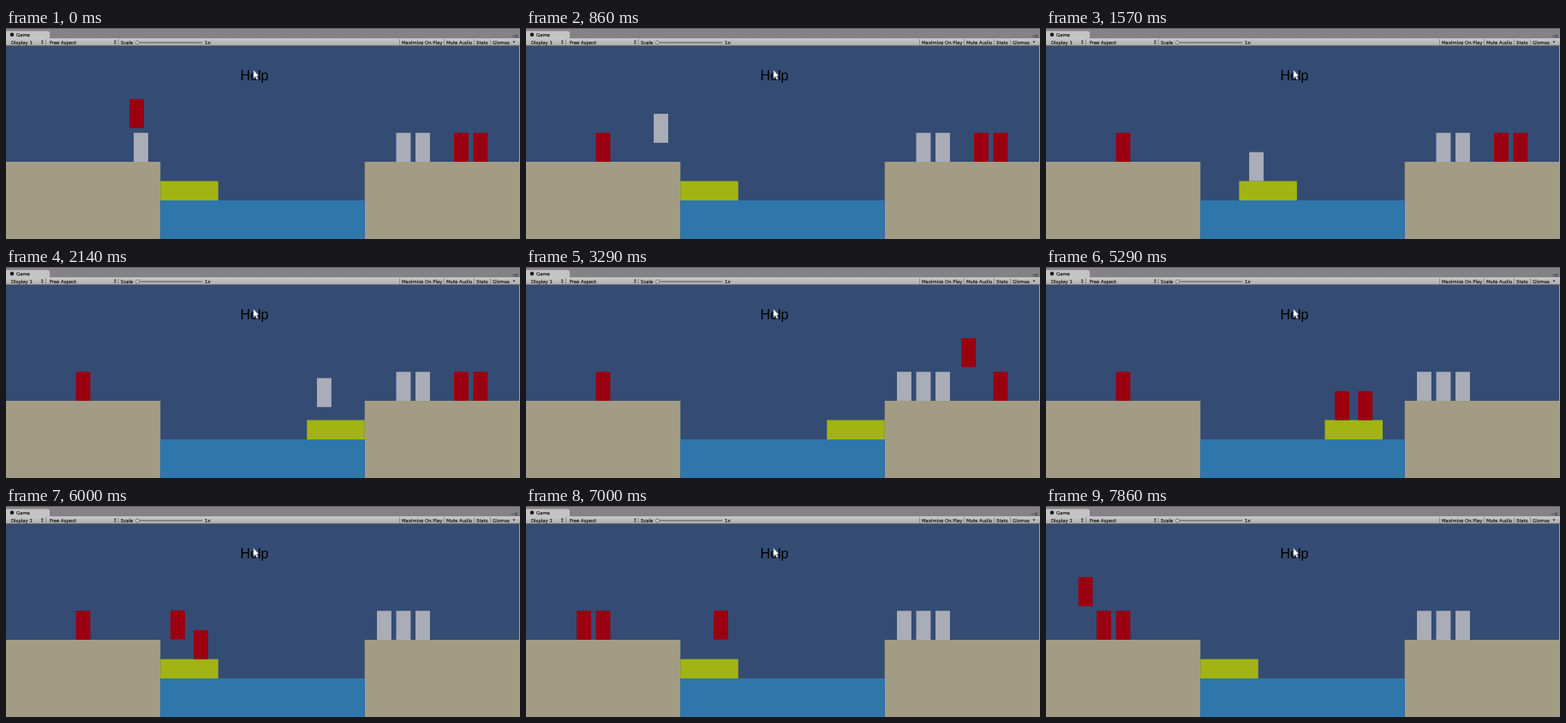
An HTML page for the animation above (8000 ms loop, 600 by 246 pixels).

```html
<!DOCTYPE html>
<html lang="en">
<head>
<meta charset="utf-8">
<title>River crossing</title>
<style>
  html, body { margin: 0; width: 100%; height: 100%; overflow: hidden; background: #344c74; }
  svg { display: block; width: 100%; height: 100%; }
  .bar { font: 5.35px "DejaVu Sans", sans-serif; fill: #1c1c1c; }
  .bar text { stroke: #1c1c1c; stroke-width: .18; }
  .help { font: 16px "Liberation Sans", Arial, sans-serif; }
</style>
</head>
<body>
<svg viewBox="0 0 600 246">
  <defs>
    <linearGradient id="tools" x2="0" y2="1">
      <stop offset="0" stop-color="#c8c8c8"/>
      <stop offset="1" stop-color="#acacac"/>
    </linearGradient>
  </defs>

  <rect width="600" height="246" fill="#344c74"/>
  <rect y="156" width="180.25" height="90" fill="#a39c84"/>
  <rect x="418.75" y="156" width="180.25" height="90" fill="#a39c84"/>
  <rect x="180.25" y="201" width="238.5" height="45" fill="#2f76ab"/>
  <rect x="599" y="21" width="1" height="225" fill="#a0a0a2"/>

  <g class="bar">
    <rect width="600" height="12" fill="#858286"/>
    <rect width="600" height="1" fill="#626064"/>
    <path d="M0 12V3.5H49L51 5V12Z" fill="#c4c4c4"/>
    <rect y="12" width="600" height="9" fill="url(#tools)"/>
    <rect y="20.2" width="600" height=".9" fill="#606266"/>
    <circle cx="7" cy="7.8" r="2.3"/>
    <text x="12" y="10.2">Game</text>
    <text x="6" y="18.8">Display 1</text>
    <text x="51" y="18.8">Free Aspect</text>
    <text x="134" y="18.8">Scale</text>
    <text x="232" y="18.8">1x</text>
    <text x="462" y="18.8">Maximize On Play</text>
    <text x="514" y="18.8">Mute Audio</text>
    <text x="549" y="18.8">Stats</text>
    <text x="568" y="18.8">Gizmos</text>
    <path d="M41 16l1.3-2 1.3 2zm0 1l1.3 2 1.3-2zM126 16l1.3-2 1.3 2zm0 1l1.3 2 1.3-2zM591.5 15.5h3l-1.5 2z"/>
    <path d="M152 17H229" stroke="#555"/>
    <circle cx="153.5" cy="17" r="2" fill="#d8d8d8" stroke="#555" stroke-width=".7"/>
    <path d="M46.5 13V20M131 13V20M459.5 13V20M511.5 13V20M546.5 13V20M565.5 13V20" stroke="#808080" stroke-width=".8"/>
    <path d="M590.5 9.5h2M593.5 8.5h4M593.5 10.5h4" stroke="#333" stroke-width=".8"/>
  </g>

  <g id="actors"></g>

  <text class="help" x="273.5" y="61">Help</text>
  <path d="M288.8 48.8V58.6L291 56.7 292.6 60.2 294.3 59.4 292.8 56H295.3Z" fill="#fff" stroke="#222" stroke-width=".4"/>
</svg>
<script>
const LOOP = 8000, FPS = 7;
const UNIT = 22.5;
const BANK_Y = 122.25, DECK_Y = 144.75, HOP_Y = 82.9;
const RED = "#9b0010", GRAY = "#a9adb7";
const layer = document.getElementById("actors");

// Standing places, counted from the left end of each bank.
const leftBank = place => 36.6 + place * UNIT;
const rightBank = place => 433 + place * UNIT;

function actor(x, y, fill, width = 0.75 * UNIT, height = 1.5 * UNIT) {
  const node = document.createElementNS("http://www.w3.org/2000/svg", "rect");
  const attributes = { width, height, fill };
  for (const name in attributes) node.setAttribute(name, attributes[name]);
  layer.append(node);
  return { node, homeX: x, homeY: y, x, y };
}

const boat = actor(180.25, 178.5, "#a2b414", 3 * UNIT, UNIT);
const redA = actor(192, DECK_Y, RED);
const redB = actor(rightBank(4), BANK_Y, RED);
const redC = actor(rightBank(5), BANK_Y, RED);
const grayA = actor(leftBank(5), BANK_Y, GRAY);
const grayB = actor(rightBank(1), BANK_Y, GRAY);
const grayC = actor(rightBank(2), BANK_Y, GRAY);
const actors = [boat, redA, redB, redC, grayA, grayB, grayC];

const progress = (now, start, end) => Math.min(1, Math.max(0, (now - start) / (end - start)));

// Up, across and down at one constant speed.
function hop(now, piece, start, end, x, y) {
  const legs = [["y", HOP_Y], ["x", x], ["y", y]];
  const length = piece.y - HOP_Y + Math.abs(x - piece.x) + y - HOP_Y;
  let left = progress(now, start, end) * length;
  for (const [axis, goal] of legs) {
    const gap = goal - piece[axis];
    const step = Math.min(left, Math.abs(gap));
    piece[axis] += Math.sign(gap) * step;
    left -= step;
    if (left <= 0) return;
  }
}

function sail(now, start, end, distance, ...riders) {
  const shift = progress(now, start, end) * distance;
  for (const item of [boat, ...riders]) item.x += shift;
}

// Times are counted in ticks of 1/7 second.
function pose(now) {
  for (const item of actors) {
    item.x = item.homeX;
    item.y = item.homeY;
  }
  hop(now, redA, -2.97, 2.76, leftBank(2), BANK_Y);
  hop(now, grayA, 5.4, 9.3, 192, DECK_Y);
  sail(now, 9.78, 14.4, 171, grayA);
  if (now > 14.5) hop(now, grayA, 14.61, 19, rightBank(0), BANK_Y);
  hop(now, redB, 21.54, 28.6, 363, DECK_Y);
  hop(now, redC, 28.95, 35.87, 390, DECK_Y);
  sail(now, 36.3, 40.95, -171, redB, redC);
  if (now > 41) hop(now, redB, 41.38, 47.7, leftBank(1), BANK_Y);
  if (now > 48) hop(now, redC, 48.38, 55.03, leftBank(0), HOP_Y);
}

function draw(time) {
  pose(Math.floor((time % LOOP + 5) * FPS / 1000) % (LOOP * FPS / 1000));
  for (const { node, x, y } of actors) {
    node.setAttribute("x", x);
    node.setAttribute("y", y);
  }
}

const began = performance.now();
function tick() {
  draw(performance.now() - began);
  requestAnimationFrame(tick);
}
tick();
</script>
</body>
</html>
```
